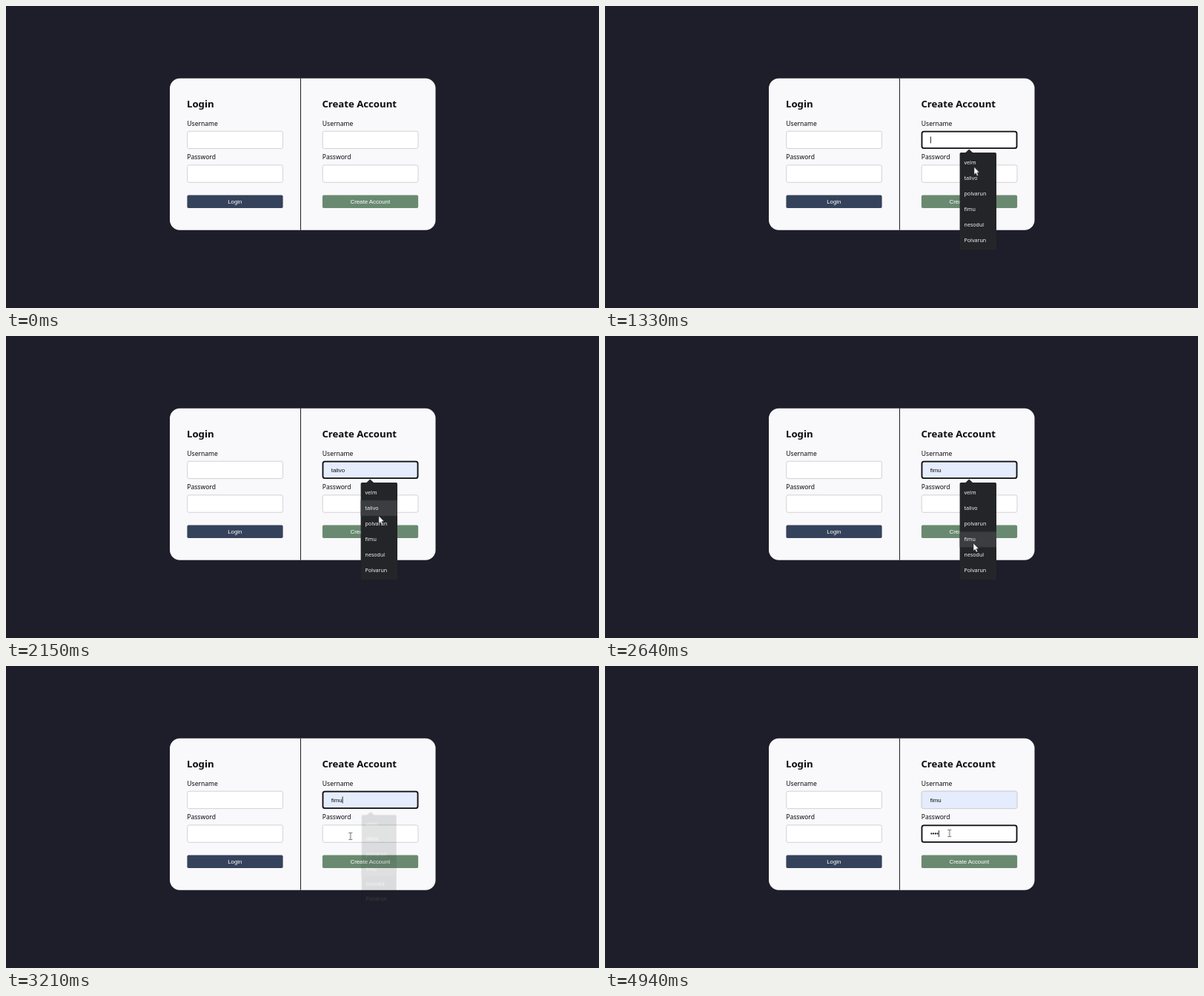
These frames come from a looping animation (800 px wide and 408 px high, 5 s). An HTML page:

```html
<!DOCTYPE html>
<html lang="en">
<head>
<meta charset="utf-8">
<title>Login form</title>
<style>
  html, body { margin: 0; width: 100%; height: 100%; overflow: hidden; background: #1e1d2a; }
  svg { display: block; }

  text { font-family: "Noto Sans", sans-serif; fill: #0c0b10; }
  .title { font-size: 13.2px; font-weight: 700; }
  .label { font-size: 8.55px; }
  .button, .value { font-family: "Liberation Sans", Arial, sans-serif; font-size: 7.85px; }
  .button { fill: #fff; text-anchor: middle; }
  .item { font-size: 7.1px; fill: #f2f2f2; }
  .field { fill: #fff; stroke: #cfcdd2; stroke-width: .9; }
  .ring { fill: none; stroke: #0d0d12; stroke-width: 1.8; }
  .caret { fill: #15151a; }

  /* Every part shares one 5 s clock; 1% is 50 ms. */
  .step, .move { animation: 5s infinite; }
  .step { animation-timing-function: step-end; }
  .move { animation-timing-function: linear; }

  .user-ring { animation-name: user-ring; }
  .pass-ring { animation-name: pass-ring; }
  .filled { animation-name: filled; }
  .empty-caret { animation-name: empty-caret; }
  .end-caret { animation-name: end-caret; }
  .values { animation-name: values; }
  .hover { animation-name: hover; }
  .typed { animation-name: typed; }
  .pass-caret { animation-name: pass-caret; }
  .popup { animation-name: popup; transform-origin: 503.4px 264px; }
  .pointer { animation-name: pointer; }
  .arrow { animation-name: arrow; }
  .beam { animation-name: beam; }

  @keyframes user-ring { 0%, 71.6% { opacity: 0 } 20.6% { opacity: 1 } 100% { opacity: 0 } }
  @keyframes pass-ring { 0% { opacity: 0 } 71.6%, 100% { opacity: 1 } }
  @keyframes filled { 0% { opacity: 0 } 31%, 100% { opacity: 1 } }
  @keyframes empty-caret { 0%, 31%, 100% { opacity: 0 } 20.6% { opacity: 1 } }
  @keyframes end-caret { 0%, 71.6%, 100% { opacity: 0 } 61.8% { opacity: 1 } }

  @keyframes values {
    0% { transform: none }
    37.6% { transform: translateY(-30px) }
    43.6% { transform: translateY(-60px) }
    48.6%, 100% { transform: translateY(-90px) }
  }
  @keyframes hover {
    0% { opacity: 0; transform: none }
    31% { opacity: 1; transform: none }
    37.6% { opacity: 1; transform: translateY(21.15px) }
    43.6% { opacity: 1; transform: translateY(42.3px) }
    48.6%, 100% { opacity: 1; transform: translateY(63.45px) }
  }
  @keyframes typed {
    0% { transform: none }
    92.8% { transform: translateX(2.75px) }
    97.6% { transform: translateX(8.25px) }
    98.8%, 100% { transform: translateX(11px) }
  }
  @keyframes pass-caret {
    0%, 81.2% { opacity: 0 }
    71.6%, 90.4%, 100% { opacity: 1 }
  }
  @keyframes popup {
    0%, 22.4% { opacity: 0; transform: scale(.945) }
    25.4%, 61.8% { opacity: 1; transform: none }
    64.6%, 100% { opacity: 0; transform: scale(.945) }
  }
  @keyframes pointer {
    0%, 21.2% { transform: translate(455.5px, 187.5px); animation-timing-function: ease-in-out }
    26.6%, 28.4% { transform: translate(498px, 217.5px) }
    31% { transform: translate(499px, 217px) }
    37%, 37.6% { transform: translate(503px, 238px) }
    40%, 41.8% { transform: translate(503px, 242px); animation-timing-function: ease-in-out }
    52.2%, 60.6% { transform: translate(497px, 280px); animation-timing-function: ease-in-out }
    64.2%, 65.4% { transform: translate(464.7px, 230px) }
    70.4%, 100% { transform: translate(464.7px, 226px) }
  }
  @keyframes arrow { 0%, 63%, 100% { opacity: 0 } 23% { opacity: 1 } }
  @keyframes beam { 0%, 23% { opacity: 0 } 16.4%, 63%, 100% { opacity: 1 } }
</style>
</head>
<body>
<svg width="800" height="408" viewBox="0 0 800 408">
  <defs>
    <clipPath id="value-box"><rect x="428" y="170" width="127" height="22"/></clipPath>
    <g id="form">
      <text class="label" x="0" y="161.7">Username</text>
      <text class="label" x="0" y="207.4">Password</text>
      <rect class="field" x=".4" y="169.2" width="128.8" height="23.4" rx="2.4"/>
      <rect class="field" x=".4" y="214.9" width="128.8" height="23.4" rx="2.4"/>
    </g>
  </defs>

  <rect width="800" height="408" fill="#1e1d2a"/>
  <rect x="221" y="97.7" width="358.5" height="205" rx="13.5" fill="#f9f8fa"/>
  <rect x="397" y="97.7" width="1" height="205" fill="#1e1d2a"/>

  <use href="#form" x="244.3"/>
  <text class="title" x="244" y="136.5">Login</text>
  <rect x="244.4" y="255.6" width="129.2" height="17.5" rx="1.8" fill="#35425b"/>
  <text class="button" x="308.8" y="267">Login</text>

  <use href="#form" x="426.8"/>
  <text class="title" x="426.4" y="136.5">Create Account</text>
  <rect x="426.9" y="255.6" width="129.2" height="17.5" rx="1.8" fill="#698a70"/>
  <text class="button" x="491.3" y="267">Create Account</text>

  <g class="step filled">
    <rect x="427.2" y="169.2" width="128.8" height="23.4" rx="2.4" fill="#e5ecfb" stroke="#c9ced9" stroke-width=".9"/>
    <g clip-path="url(#value-box)">
      <g class="step values">
        <text class="value" x="438.8" y="183.6">velm</text>
        <text class="value" x="438.8" y="213.6">talivo</text>
        <text class="value" x="438.8" y="243.6">polvarun</text>
        <text class="value" x="438.8" y="273.6">fimu</text>
      </g>
    </g>
  </g>
  <rect class="step caret empty-caret" x="438.9" y="176.4" width=".9" height="9"/>
  <rect class="step caret end-caret" x="453.6" y="176.4" width=".9" height="9"/>
  <rect class="step ring user-ring" x="427.5" y="169.6" width="128" height="22.6" rx="2.6"/>

  <g fill="#15151a">
    <circle cx="440.4" cy="226.4" r="1.1"/>
    <circle cx="443.15" cy="226.4" r="1.1"/>
    <circle cx="445.9" cy="226.4" r="1.1"/>
    <circle cx="448.65" cy="226.4" r="1.1"/>
  </g>
  <g class="step typed">
    <rect x="438.9" y="221" width="13" height="11" fill="#fff"/>
    <rect class="step caret pass-caret" x="438.9" y="222" width=".9" height="9"/>
  </g>
  <rect class="step ring pass-ring" x="427.5" y="215.3" width="128" height="22.6" rx="2.6"/>

  <g class="move popup">
    <path d="M485.8 198.6L491.2 193.4L496.6 198.6Z" fill="#242528"/>
    <rect x="478.6" y="198.1" width="49.4" height="131.2" rx="1.6" fill="#242528"/>
    <rect class="step hover" x="478.6" y="200.8" width="49.4" height="21.1" fill="#3c3d40"/>
    <text class="item" x="484.5" y="213.7">velm</text>
    <text class="item" x="484.5" y="234.85">talivo</text>
    <text class="item" x="484.5" y="256">polvarun</text>
    <text class="item" x="484.5" y="277.15">fimu</text>
    <text class="item" x="484.5" y="298.3">nesodul</text>
    <text class="item" x="484.5" y="319.45">Polvarun</text>
  </g>

  <g class="move pointer">
    <path class="step arrow" d="M0 0V10.3L2.3 8.2L3.9 11.9L5.6 11.2L4 7.5H7.2Z" fill="#fff" stroke="#222" stroke-width=".5"/>
    <path class="step beam" d="M-2.4 -4.6H-.8L0 -4L.8 -4.6H2.4M0 -4V4M-2.4 4.6H-.8L0 4L.8 4.6H2.4" fill="none" stroke="#55555a" stroke-width=".9"/>
  </g>
</svg>
</body>
</html>
```
